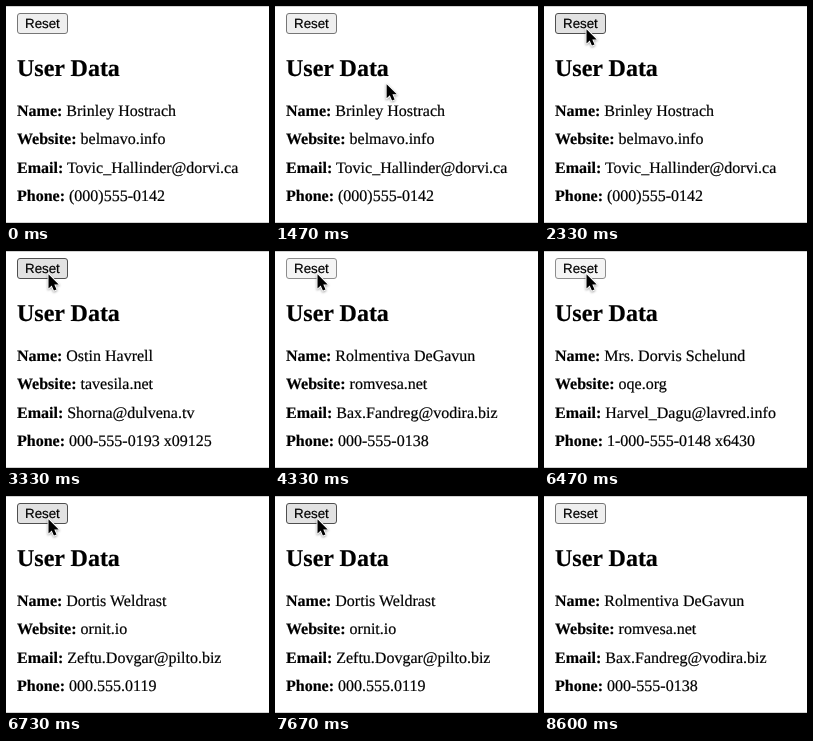
Write an HTML page that moves like this. It is 263 by 217 pixels and loops after 9540 ms.

```html
<!DOCTYPE html>
<html lang="en">
<head>
<meta charset="utf-8">
<title>User Data</title>
<style>
  html, body { margin: 0; width: 100%; height: 100%; overflow: hidden; background: #fff; }
  svg { display: block; width: 263px; height: 217px; }
  text {
    font: 16px "Liberation Serif", "Times New Roman", serif; white-space: pre;
    text-rendering: geometricPrecision; stroke: #000; stroke-width: .2px;
  }
  .label { font-weight: bold; }
  .title { font-size: 24px; font-weight: bold; }
  .button { font: 13.33px "Liberation Sans", Arial, sans-serif; }
  #cursor { filter: drop-shadow(.5px 1px .8px rgba(0, 0, 0, .35)); }
</style>
</head>
<body>
<svg viewBox="0 0 263 217">
  <path d="M0 .5H263M0 216.5H263" stroke="#d2d2d2"/>
  <rect id="button" x="11.5" y="7.5" width="50" height="20" rx="2.5"/>
  <text class="button" x="19" y="22">Reset</text>
  <text class="title" x="11" y="70">User Data</text>
  <g id="rows"></g>
  <path id="cursor" d="M0 0V14.2L3.2 11.2L5.4 16.4L8 15.3L5.8 10.2H10.2Z"
        stroke="#fff" stroke-width="1.8" paint-order="stroke" stroke-linejoin="round"/>
</svg>
<script>
const LOOP = 9540, TICK = 1000 / 15;
const LABELS = ["Name", "Website", "Email", "Phone"];

const brinley = ["Brinley Hostrach", "belmavo.info", "Tovic_Hallinder@dorvi.ca", "(000)555-0142"];
const ostin = ["Ostin Havrell", "tavesila.net", "Shorna@dulvena.tv", "000-555-0193 x09125"];
const rolmentiva = ["Rolmentiva DeGavun", "romvesa.net", "Bax.Fandreg@vodira.biz", "000-555-0138"];
const rolmentive = ["Rolmentive Raudh", "somila.info", "Davtun@gasudia.net", "1-000-555-0167"];
const dorvis = ["Mrs. Dorvis Schelund", "oqe.org", "Harvel_Dagu@lavred.info", "1-000-555-0148 x6430"];
const dortis = ["Dortis Weldrast", "ornit.io", "Zeftu.Dovgar@pilto.biz", "000.555.0119"];

// [time the response arrives, user]
const USERS = [[0, brinley], [2730, ostin], [3530, rolmentiva], [4600, rolmentive],
               [5670, dorvis], [6730, dortis], [7800, rolmentiva]];
// [mouse down, mouse up]
const CLICKS = [[2270, 2330], [3270, 3330], [4330, 4400], [5400, 5530], [6470, 6600], [7530, 7670]];
const COLORS = { normal: ["#efefef", "#767676"], hover: ["#e2e2e2", "#4f4f4f"], active: ["#f5f5f5", "#8d8d8d"] };

const $ = id => document.getElementById(id);
const button = $("button"), cursor = $("cursor");

$("rows").innerHTML = LABELS.map((label, i) =>
  `<text x="11" y="${110.3 + 28.1 * i}"><tspan class="label">${label}:</tspan> <tspan class="value"></tspan></text>`).join("");
const values = document.querySelectorAll(".value");

// Pointer tip, or null while it is off the page
function pointer(t) {
  const tick = Math.floor((t + 5) / TICK);
  if (tick < 16 || tick > 128) return null;
  if (tick === 127) return [68, 17];
  if (tick === 128) return [108, 8];
  const left = Math.max(0, 1 - (tick - 16) / 14);
  return [42.5 + 177 * left ** 1.68, 23.2 + 184 * left ** 2.16];
}

function buttonState(t, tip) {
  if (CLICKS.some(([down, up]) => t >= down && t < up)) return "active";
  return tip && tip[0] < 62 && tip[1] < 28 ? "hover" : "normal";
}

function draw(t) {
  const tip = pointer(t);
  cursor.style.display = tip ? "" : "none";
  if (tip) cursor.setAttribute("transform", `translate(${tip})`);

  const [fill, stroke] = COLORS[buttonState(t, tip)];
  button.setAttribute("fill", fill);
  button.setAttribute("stroke", stroke);

  const user = USERS.findLast(([from]) => t >= from)[1];
  values.forEach((el, i) => { el.textContent = user[i]; });
}

const start = performance.now();
function frame() {
  draw((performance.now() - start) % LOOP);
  requestAnimationFrame(frame);
}
frame();
</script>
</body>
</html>
```
